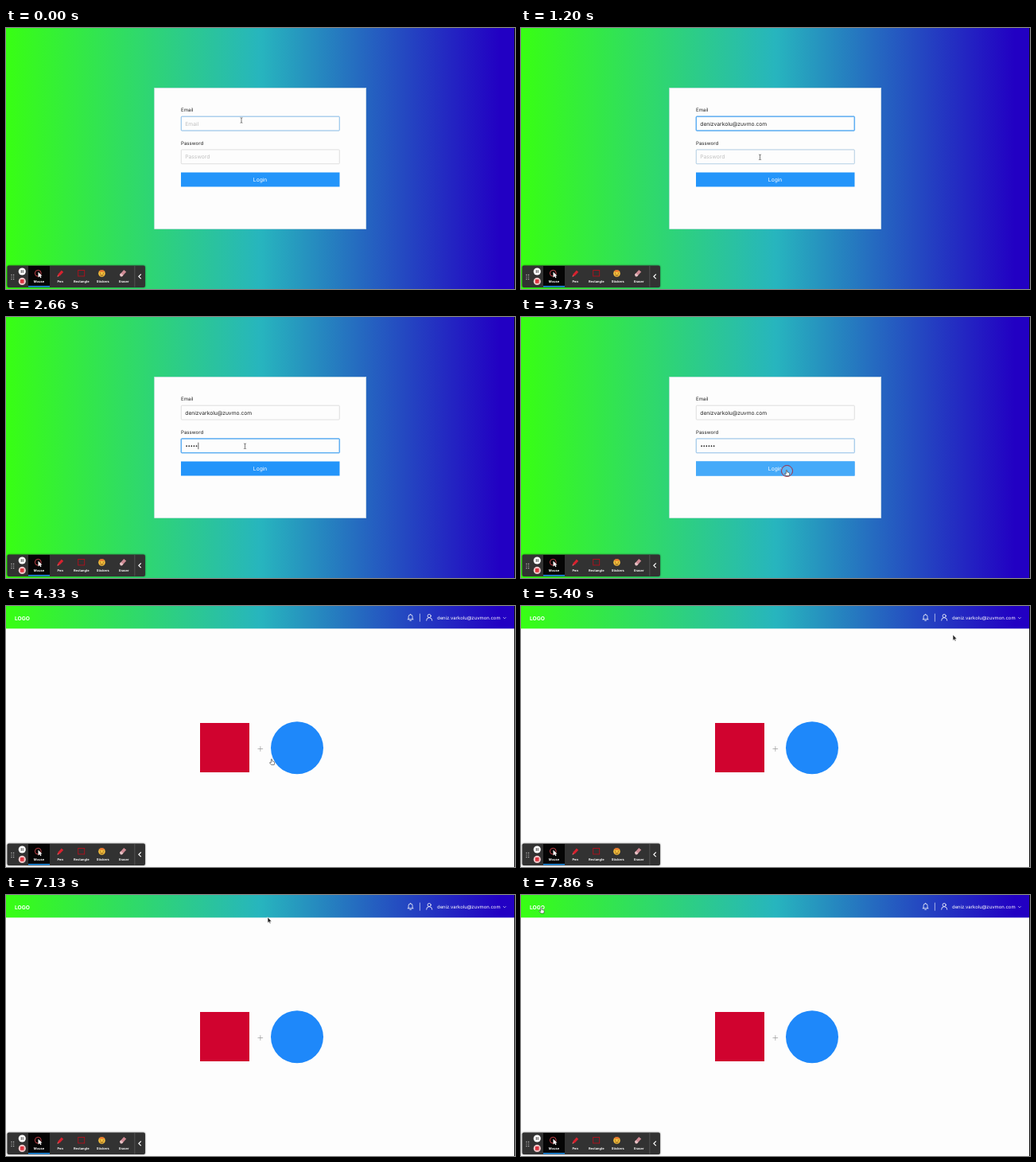
An HTML page for the animation above (8000 ms loop, 640x328 px).

```html
<!DOCTYPE html>
<html lang="en">
<head>
<meta charset="utf-8">
<title>Login demo</title>
<style>
  html, body { margin: 0; width: 100%; height: 100%; overflow: hidden; background: #fdfdfd; }
  svg { display: block; width: 640px; height: 328px; }
  text { font-family: Inter, Roboto, sans-serif; font-size: 6.7px; fill: #222; text-rendering: geometricPrecision; }
  .label { font-size: 6.1px; }
  .hint { fill: #bfbfbf; }
  .white { fill: #fff; }
  .mid { text-anchor: middle; }
  .field { fill: #fdfdfd; stroke: #d9d9d9; stroke-width: .8; }
  .hover { fill: none; stroke: #7cbdf3; stroke-width: .8; }
  .focus { fill: none; stroke: #47a6f5; stroke-width: .8; }
  .glow { fill: none; stroke: #1890ff; stroke-opacity: .15; stroke-width: 2; }
  .line { fill: none; stroke: #fff; stroke-width: .8; stroke-linecap: round; stroke-linejoin: round; }
  .thin { stroke-width: .6; }
  .tools text { font-size: 4px; font-weight: 700; fill: #f4f4f4; text-anchor: middle; }
</style>
</head>
<body>
<svg viewBox="0 0 640 328">
  <defs>
    <linearGradient id="sky">
      <stop offset="0" stop-color="#38ff13"/>
      <stop offset=".5" stop-color="#27b5be"/>
      <stop offset=".97" stop-color="#2200c3"/>
    </linearGradient>
    <filter id="soft" x="-10%" y="-30%" width="120%" height="160%">
      <feDropShadow dx="0" dy="0" stdDeviation="1" flood-opacity=".5"/>
    </filter>
    <rect id="box" width="199" height="17.8" rx=".8"/>
  </defs>

  <g data-on="0 3860">
    <rect width="640" height="328" fill="url(#sky)"/>
    <rect x="186.7" y="75.5" width="266" height="177" fill="#fdfdfd" stroke="#d5e3e8" stroke-width=".7"/>

    <text class="label" x="220" y="105">Email</text>
    <use href="#box" x="220.3" y="111.2" class="field"/>
    <use href="#box" x="220.3" y="111.2" class="hover" data-on="-1000 1400" data-fade="200"/>
    <g data-on="400 1400" data-fade="200">
      <use href="#box" x="220.3" y="111.2" class="glow"/>
      <use href="#box" x="220.3" y="111.2" class="focus"/>
    </g>
    <text class="hint" x="225.3" y="122.6" data-on="0 730">Email</text>
    <text x="225.3" y="122.6" data-on="730 3860">denizvarkolu@zuvmo.com</text>
    <rect x="225.3" y="116" width=".6" height="8.5" data-on="400 730"/>

    <text class="label" x="220" y="146.7">Password</text>
    <use href="#box" x="220.3" y="152.9" class="field"/>
    <use href="#box" x="220.3" y="152.9" class="hover" data-on="1100 3600" data-fade="200"/>
    <g data-on="1400 3600" data-fade="200">
      <use href="#box" x="220.3" y="152.9" class="glow"/>
      <use href="#box" x="220.3" y="152.9" class="focus"/>
    </g>
    <text class="hint" x="225.3" y="164.4" data-on="0 2000">Password</text>
    <g id="dots" fill="#222"></g>
    <rect id="caret" y="157.7" width=".6" height="8.5" data-on="1530 3600"/>

    <rect x="220" y="181.5" width="199.5" height="18" fill="#2395fa"/>
    <rect x="220" y="181.5" width="199.5" height="18" fill="#45aaf9" data-on="3330 3860" data-fade="200"/>
    <text class="white mid" x="319.6" y="192.9">Login</text>
  </g>

  <g data-on="3860 8000">
    <rect width="640" height="328" fill="#fdfdfd"/>
    <rect width="640" height="28.4" fill="url(#sky)"/>
    <text class="white" x="11" y="17.6" font-weight="700">LOGO</text>
    <path class="line" d="M505.2 16.8h6.8M506.1 16.6v-3.2a2.5 2.5 0 0 1 5 0v3.2M508.6 10.8v-.5M507.8 18.3h1.6"/>
    <path class="line thin" d="M520.4 10v9.3"/>
    <circle class="line" cx="532.2" cy="12.5" r="2.1"/>
    <path class="line" d="M528.6 18.2a3.6 3.6 0 0 1 7.2 0"/>
    <text class="white" x="542" y="17.3" style="font-size:5.95px">deniz.varkolu@zuvmon.com</text>
    <path class="line thin" d="M625.4 14.4l1.5 1.5 1.5-1.5"/>
    <rect x="244" y="147" width="62" height="62" fill="#d0032f"/>
    <path d="M316.5 179.5h6.6M319.8 176.2v6.6" stroke="#999" stroke-width=".7"/>
    <circle cx="366" cy="178.3" r="33" fill="#1e88fa"/>
  </g>
  <path d="M639.5 0v328" stroke="#111"/>

  <g class="tools">
    <rect x="1.5" y="298.5" width="173.5" height="27.5" rx="2" fill="#333" filter="url(#soft)"/>
    <path d="M161.8 299v26.5" stroke="#666" stroke-width=".6"/>
    <path d="M7 309.8v6.5M9.6 309.8v6.5" stroke="#bbb" stroke-width="1.2" stroke-dasharray="1.2 1.4"/>
    <circle cx="20.3" cy="306" r="4.6" fill="#fff"/>
    <path d="M19.3 304.2v3.6M21.3 304.2v3.6" stroke="#333" stroke-width=".9"/>
    <circle cx="20.3" cy="318.4" r="4.6" fill="#eec4c6"/>
    <rect x="18" y="316.1" width="4.6" height="4.6" rx=".6" fill="#dc3540"/>
    <rect x="28" y="299" width="27" height="26.5" fill="#050505"/>
    <rect x="28" y="324" width="27" height="1.5" fill="#2196f3"/>
    <circle cx="40.3" cy="308.2" r="3.9" fill="none" stroke="#d9474f" stroke-width=".9"/>
    <path d="M40.5 306.5v7l1.7-1.5 1.2 2.2 1.1-.6-1.1-2.1h2.1z" fill="#fff"/>
    <path d="M64.6 312.4l.8-3 4.4-4.8 2.4 2.2-4.6 4.8z" fill="#d8222f"/>
    <path d="M64.6 312.4l.4-1.5 1.1 1z" fill="#f3b7a8"/>
    <rect x="90.7" y="304.5" width="8" height="7.4" fill="none" stroke="#b3101c" stroke-width=".9"/>
    <circle cx="120.5" cy="308.4" r="4.3" fill="#f3bd3c"/>
    <path d="M116.8 306.3a4.3 4.3 0 0 1 7.4 0z" fill="#e4632c"/>
    <path d="M118.6 307.7v1M122.4 307.7v1M118.5 310.3q2 1.6 4 0" fill="none" stroke="#5b3310" stroke-width=".8"/>
    <path d="M143 309.8l5.2-5.8 3 2.4-5.2 5.8h-2z" fill="#cf8a94"/>
    <path d="M143 309.8l1.4-1.6 3 2.4-1.4 1.6h-2z" fill="#e6c3c6"/>
    <text x="41.5" y="319.8">Mouse</text>
    <text x="68.2" y="319.8">Pen</text>
    <text x="94.8" y="319.8">Rectangle</text>
    <text x="121.8" y="319.8">Stickers</text>
    <text x="148.3" y="319.8">Eraser</text>
    <path d="M169.8 309.4l-2.9 2.9 2.9 2.9" fill="none" stroke="#fff" stroke-width="1.2"/>
  </g>

  <g id="pointer">
    <circle cy="-2.5" r="7" fill="#fff" fill-opacity=".12" stroke="#a3263b" stroke-width="1" data-on="330 600 1400 1730 3660 3860"/>
    <path d="M-1.4-3.3q1.4 0 1.4.9v4.8q0 .9-1.4.9M1.4-3.3q-1.4 0-1.4.9M0 2.4q0 .9 1.4.9" fill="none" stroke="#444" stroke-width=".7" data-on="0 3330"/>
    <path d="M-1.2-3.4q.7-.8 1.3 0v2.3l2.4.6q.8.3.7 1.2l-.5 2.9h-3.5l-2.3-2.7q.3-1 1.9.1z" fill="#fff" stroke="#333" stroke-width=".6" stroke-linejoin="round" data-on="3330 4600 5600 7000 7800 8000"/>
    <path d="M-2-4v7.4l1.7-1.5 1.1 2.4 1.2-.6-1.1-2.3h2.2z" fill="#222" stroke="#fff" stroke-width=".6" data-on="4600 5600 7000 7800"/>
  </g>
</svg>
<script>
  const LOOP = 8000;
  const keys = [2000, 2130, 2330, 2530, 2660, 2930];
  // time, x, y
  const path = [
    [0, 296, 116], [1000, 296, 116], [1190, 300.5, 162.3],
    [3130, 300.5, 162.3], [3460, 334.5, 196], [4600, 334.5, 196],
    [4730, 410, 130], [5000, 410, 130], [5130, 545, 40],
    [5400, 545, 40], [5660, 585, 18], [5800, 585, 18], [6060, 512, 18.5],
    [7000, 512, 18.5], [7260, 150, 45], [7600, 150, 45], [7840, 26, 19.5], [LOOP, 26, 19.5]
  ];
  const get = id => document.getElementById(id);
  const clamp = v => Math.min(1, Math.max(0, v));
  const ease = k => k * k * (3 - 2 * k);

  get('dots').innerHTML = keys.map((t, i) =>
    `<circle cx="${227.1 + 3.1 * i}" cy="162.2" r=".85" data-on="${t} 3860"/>`).join('');

  const parts = [...document.querySelectorAll('[data-on]')].map(el => ({
    el, times: el.dataset.on.split(' ').map(Number), fade: +el.dataset.fade || 0
  }));

  function level(t, times, fade) {
    let v = 0;
    for (let i = 0; i < times.length; i += 2) {
      const [a, b] = [times[i], times[i + 1]];
      if (!fade) v = Math.max(v, t >= a && t < b ? 1 : 0);
      else v = Math.max(v, Math.min(clamp((t - a) / fade), 1 - clamp((t - b) / fade)));
    }
    return v;
  }

  function draw(t) {
    for (const { el, times, fade } of parts) {
      const v = level(t, times, fade);
      el.style.display = v ? '' : 'none';
      el.style.opacity = v;
    }
    const typed = keys.filter(k => t >= k).length;
    get('caret').setAttribute('x', typed ? 226.1 + 3.1 * typed : 225.3);
    const i = path.findIndex(p => p[0] > t);
    const [t0, x0, y0] = path[i - 1], [t1, x1, y1] = path[i];
    const k = ease((t - t0) / (t1 - t0));
    get('pointer').setAttribute('transform', `translate(${x0 + (x1 - x0) * k} ${y0 + (y1 - y0) * k})`);
  }

  let start;
  function tick(now) {
    start ??= now;
    draw((now - start) % LOOP);
    requestAnimationFrame(tick);
  }
  draw(0);
  requestAnimationFrame(tick);
</script>
</body>
</html>
```
